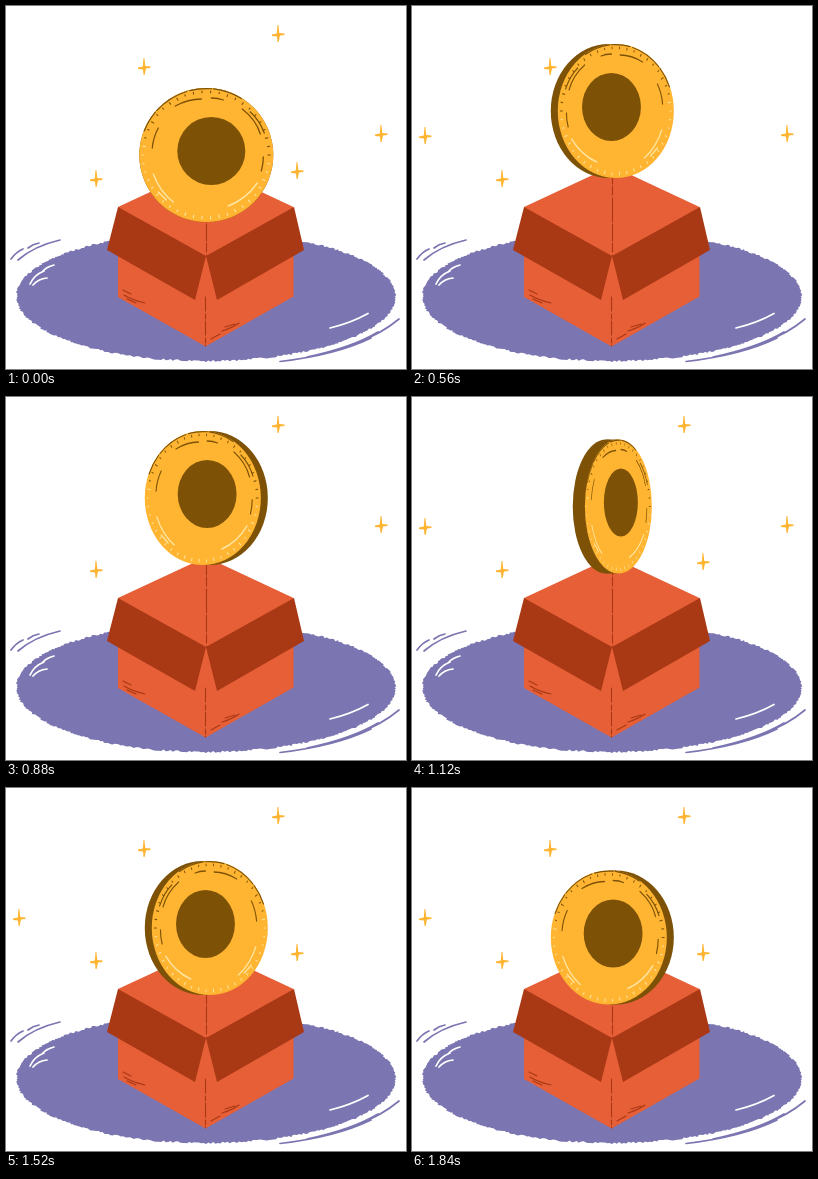
Animation, 400 px wide and 363 px high, one loop 1920 ms. Source, as an HTML page:

```html
<!DOCTYPE html>
<html lang="en">
<head>
<meta charset="utf-8">
<title>Coin over a box</title>
<style>
  html, body { margin: 0; width: 100%; height: 100%; overflow: hidden; background: #fff; }
  svg { display: block; width: 100vw; height: 100vh; }
  .line { fill: none; stroke-linecap: round; stroke-linejoin: round; }
  .violet { stroke: #7b75b1; }
  .white { stroke: #fff; }
  .rust { stroke: #a93815; }
  .brown { stroke: #7d5206; }
  .pale { stroke: #ffe5a3; }
</style>
</head>
<body>
<svg viewBox="0 0 400 363">
  <path id="shadow" fill="#7b75b1"/>
  <g class="line violet" stroke-width="1.7">
    <path d="M5 253Q10 246 17 243M12 254Q28 240 54 234M22 242Q27 238 33 237"/>
    <path d="M274 355.5Q330 349 365 332M301 351Q345 342 372 326M352 336Q375 328 393 313"/>
  </g>
  <g class="line white" stroke-width="1.7">
    <path d="M24 278Q28 269 38 265M27 279Q32 273 41 272M36 266Q40 261 48 259"/>
    <path d="M324 322Q345 317 362 307.5"/>
  </g>

  <path fill="#e65f36" d="M200 160L287.5 201V290.5L199.5 340.5L112 291V201Z"/>
  <g fill="#a93815">
    <path d="M112 201L200 250L189 294L101 244Z"/>
    <path d="M288 201L298 244L211 294L200 250Z"/>
  </g>
  <g class="line rust" stroke-width="1.1">
    <path d="M200.5 161V250" stroke-dasharray="17 2 9 3 24 2"/>
    <path d="M199.5 291V340" stroke-dasharray="14 3 5 2"/>
    <path d="M117 284L125 288M118 289Q126 294 139 297M121 293L130 297"/>
    <path d="M205 333L214 328M216 325Q226 322 233 317M219 321L229 318"/>
  </g>

  <g id="sparks" fill="#ffb531"></g>

  <g id="coin">
    <g fill="#7d5206">
      <ellipse id="back" ry="67"/>
      <rect id="rim" y="-67" height="134"/>
    </g>
    <g id="face">
      <circle r="67" fill="#ffb531"/>
      <path class="line brown" stroke-width="1.2" d="M-62 -24A66.5 66.5 0 0 1 35 -56.5" stroke-dasharray="22 2 36 3"/>
      <g id="ticks" class="line" stroke-width="1.1"></g>
      <g class="line brown" stroke-width="1.3">
        <path d="M-31 -49Q-18 -56 -5 -56M5 -57Q12 -57 17 -55M36 -46Q50 -35 54 -21M44 -43Q53 -35 58 -22"/>
        <path d="M-54 -7Q-53 -18 -48 -27M57 2Q57 9 55 16"/>
      </g>
      <g class="line pale" stroke-width="1.4">
        <path d="M-53 19Q-47 36 -33 47M-48 37L-40 45M22 51Q40 44 51 28"/>
      </g>
      <circle cx="5" cy="-4" r="34" fill="#7d5206"/>
    </g>
  </g>
</svg>
<script>
const LOOP = 1920, STEP = 80, RADIUS = 67, DEPTH = 14;
const $ = id => document.getElementById(id);

function add(parent, tag, attrs) {
  const node = document.createElementNS('http://www.w3.org/2000/svg', tag);
  set(node, attrs);
  parent.append(node);
  return node;
}
function set(node, attrs) {
  for (const key in attrs) node.setAttribute(key, attrs[key]);
}

let seed = 7;
const random = () => (seed = seed * 16807 % 2147483647) / 2147483647;

// Brushed edge of the ground shadow
let outline = '';
for (let i = 0; i < 500; i++) {
  const a = i / 500 * 2 * Math.PI, grow = random() * 2 - 1;
  const x = 200 + (189.5 + grow) * Math.cos(a);
  const y = 290.5 + (64.5 + grow) * Math.sin(a);
  outline += (i ? 'L' : 'M') + x.toFixed(1) + ' ' + y.toFixed(1);
}
$('shadow').setAttribute('d', outline + 'Z');

// Milled ticks: darker above, paler below
for (let i = 0; i < 46; i++) {
  const a = i / 46 * 2 * Math.PI, inner = 61 + random() * 2;
  const dark = Math.sin(a) < random() * 0.5 - 0.3;
  const at = r => (r * Math.cos(a)).toFixed(1) + ' ' + (r * Math.sin(a)).toFixed(1);
  add($('ticks'), 'path', { class: dark ? 'brown' : 'pale', d: `M${at(inner)}L${at(64)}` });
}

// Place of each sparkle and the spans in which it shows
const sparks = [
  [138, 61, [0, 720], [1440, LOOP]],
  [272, 28, [0, 160], [720, LOOP]],
  [375, 128, [0, 1360]],
  [291, 165, [0, 400], [1040, LOOP]],
  [90, 173, [0, 160], [480, LOOP]],
  [13, 130, [480, 720], [1040, LOOP]]
].map(([x, y, ...spans]) => ({
  spans,
  node: add($('sparks'), 'path', {
    transform: `translate(${x} ${y})`,
    d: 'M.4 -9L1.3 -1L6.5 -.4V1L2 1.6L.6 8H-.5L-1 2.4L-6 2V.6L-1.2 -.6L-.5 -9Z'
  })
}));

// Time and height of the coin's centre
const path = [
  [0, 149], [320, 123], [560, 105], [640, 101.5], [720, 100], [800, 100], [880, 101],
  [1120, 109.5], [1280, 122], [1520, 140], [1600, 145], [1680, 148.5], [1840, 149.5], [LOOP, 149]
];
function height(t) {
  const i = path.findIndex(p => p[0] > t);
  const [t0, y0] = path[i - 1], [t1, y1] = path[i];
  return y0 + (y1 - y0) * (t - t0) / (t1 - t0);
}

function draw(now) {
  const t = Math.floor(now % LOOP / STEP) * STEP;
  const turn = t / LOOP * 4 * Math.PI;
  const c = Math.cos(turn);
  // The visible face leans to the side it looks at
  const lean = DEPTH / 2 * Math.sin(turn) * (c < 0 ? -1 : 1);

  set($('coin'), { transform: `translate(200.3 ${height(t)})` });
  set($('face'), { transform: `translate(${lean.toFixed(2)} 0) scale(${c.toFixed(4)} 1)` });
  set($('back'), { cx: -lean, rx: Math.abs(c) * RADIUS });
  set($('rim'), { x: -Math.abs(lean), width: 2 * Math.abs(lean) });
  for (const { node, spans } of sparks) {
    const on = spans.some(([from, to]) => t >= from && t < to);
    node.style.visibility = on ? 'visible' : 'hidden';
  }
}

let start;
function tick(now) {
  start ??= now;
  draw(now - start);
  requestAnimationFrame(tick);
}
draw(0);
requestAnimationFrame(tick);
</script>
</body>
</html>
```
